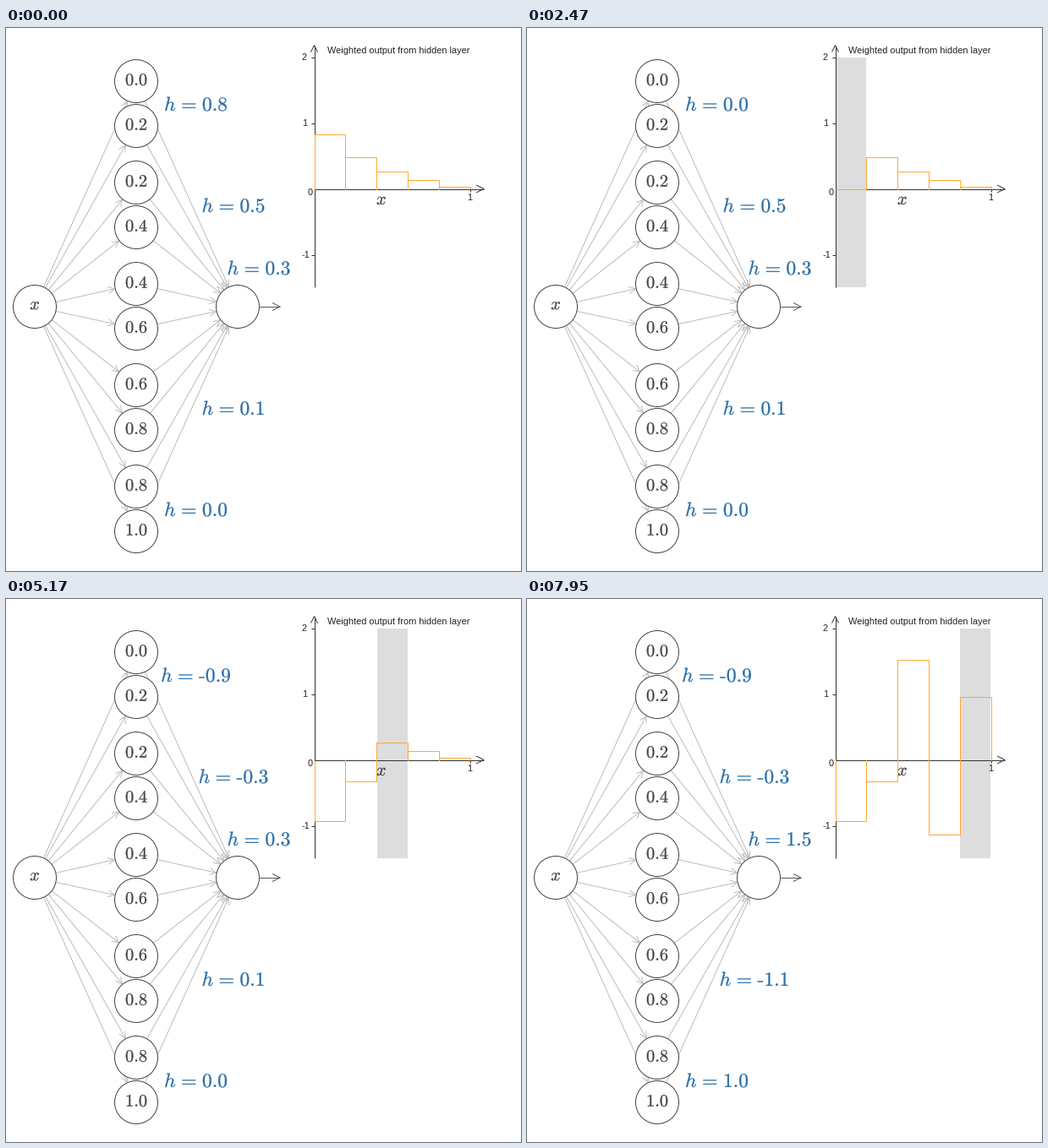
A matplotlib script that plays this animation: 609x643 px, repeating every 8000 ms.

```python
from functools import lru_cache

import matplotlib.pyplot as plt
import numpy as np
from matplotlib.animation import FuncAnimation
from matplotlib.patches import Circle, PathPatch, Rectangle
from matplotlib.path import Path
from matplotlib.textpath import TextPath
from matplotlib.transforms import Affine2D

WIDTH, HEIGHT, DPI = 609, 643, 100
PX = 72 / DPI  # one pixel in points
LOOP, INTERVAL = 8000, 20
TICK, TICK_SHIFT = 77.3, 17  # pointer sampling period and phase, ms

INK, AXIS, WIRE = "#444444", "#333333", "#bdbdbd"
BLUE, ORANGE, SHADE = "#2a6ea6", "#ffa833", "#dddddd"

ORIGIN_X, ORIGIN_Y = 364.5, 190.5
UNIT, BAR = 78, 36.8
RADIUS = 25.5
INPUT, OUTPUT = (34, 330), (274, 330)
LABEL_SIZE = 23.5
LABEL_SPOTS = [(224.5, 98), (269, 218), (299, 292), (269, 458), (224.5, 578)]

# (tick, height) keys of each bar while it is dragged
KEYS = [
    [(12, .83), (13, .6), (23, 1.46), (25, 1.53), (27, 1.53), (32, 0), (38, -.92), (39, -.93)],
    [(45, .48), (46, .4), (47, .4), (54, 1.55), (55, 1.54), (58, .1), (59, -.06), (62, -.33)],
    [(70, .26), (78, 1.52)],
    [(86, .135), (92, -1.12), (93, -1.12), (94, -1.14)],
    [(99, .03), (100, .09), (101, .09), (102, .6), (103, .96)],
]
# (tick, bar) moments at which the pointer enters a bar
HOVERS = [(4, 2), (5, 0), (40, 1), (67, 2), (81, 3), (95, 4)]

plt.rcParams["mathtext.fontset"] = "cm"
fig = plt.figure(figsize=(WIDTH / DPI, HEIGHT / DPI), dpi=DPI, facecolor="white")
ax = fig.add_axes([0, 0, 1, 1])
ax.set(xlim=(0, WIDTH), ylim=(HEIGHT, 0))
ax.axis("off")


def stroke(points, color):
    path = Path(points)
    return ax.add_patch(PathPatch(path, fill=False, edgecolor=color, lw=PX))


def arrow(start, end, color, back=8, half=4):
    start, end = np.array(start, float), np.array(end, float)
    along = (end - start) / np.hypot(*(end - start))
    side = np.array([-along[1], along[0]])
    stroke([start, end], color)
    base = end - back * along
    stroke([base + half * side, end, base - half * side], color)


def link(a, b):
    """Arrow between the rims of two nodes."""
    a, b = np.array(a, float), np.array(b, float)
    rim = RADIUS * (b - a) / np.hypot(*(b - a))
    arrow(a + rim, b - 1.02 * rim, WIRE)


def node(center):
    ax.add_patch(Circle(center, RADIUS, facecolor="white", edgecolor=INK, lw=PX))


@lru_cache(None)
def math_path(text, size):
    return TextPath((0, 0), f"${text}$", size=size)


def ink(path, x, y, color):
    """Glyph outlines with their baseline at (x, y)."""
    place = Affine2D().scale(1, -1).translate(x, y) + ax.transData
    return ax.add_patch(PathPatch(path, facecolor=color, edgecolor=color,
                                  lw=0.3 * PX, transform=place))


def box(x0, x1, y0, y1):
    return Path([(x0, y0), (x1, y0), (x1, y1), (x0, y1), (x0, y0)], closed=True)


@lru_cache(None)
def label_path(tenths):
    """Centred 'h = value' with a hyphen as the minus sign."""
    em = Affine2D().scale(LABEL_SIZE)
    shift = 1.91 + (.333 if tenths < 0 else 0)
    parts = [math_path("h", LABEL_SIZE),
             box(.91, 1.576, .327, .367).transformed(em),
             box(.91, 1.576, .133, .173).transformed(em)]
    if tenths < 0:
        parts.append(box(1.921, 2.186, .187, .245).transformed(em))
    digits = math_path(f"{abs(tenths) / 10:.1f}", LABEL_SIZE)
    parts.append(digits.transformed(Affine2D().translate(shift * LABEL_SIZE, 0)))
    middle = (shift + 1.278) * LABEL_SIZE / 2
    return Path.make_compound_path(*parts).transformed(Affine2D().translate(-middle, 0))


def sans(x, y, text, ha="left"):
    ax.text(x, y, text, family="Liberation Sans", size=11 * PX, color="#222222",
            ha=ha, va="baseline")


# network
hidden = [(154, 89.5 + 120 * i + d) for i in range(5) for d in (-26.5, 26.5)]
for spot in hidden:
    link(INPUT, spot)
    link(spot, OUTPUT)
for i, (x, y) in enumerate(hidden):
    node((x, y))
    ink(math_path(f"{(i + 1) // 2 * .2:.1f}", 20.4), x - 13, y + 4.8, INK)
node(INPUT)
node(OUTPUT)
ink(math_path("x", 20.4), 28.2, 333.3, INK)
arrow((299.5, 330), (324, 330), "#555555", 9, 4.5)
labels = [ink(label_path(0), x, y, BLUE) for x, y in LABEL_SPOTS]

# chart
shade = ax.add_patch(Rectangle((0, 35), BAR - .8, 272, facecolor=SHADE, lw=0))
arrow((ORIGIN_X, 307), (ORIGIN_X, 20.5), AXIS, 8, 4)
arrow((ORIGIN_X, ORIGIN_Y), (565, ORIGIN_Y), AXIS, 9, 4.5)
for value in (2, 1, -1):
    y = ORIGIN_Y - UNIT * value
    stroke([(361, y), (ORIGIN_X, y)], AXIS)
    sans(350, y + 3, str(value))
stroke([(548.5, ORIGIN_Y), (548.5, 194)], AXIS)
sans(357, 198, "0")
sans(548, 204, "1", "center")
sans(380, 30, "Weighted output from hidden layer")
ink(math_path("x", 20.4), 438, 209, INK)
steps = stroke([(0, 0), (1, 1)], ORANGE)


def update(frame):
    tick = int(((frame + .5) * INTERVAL + TICK_SHIFT) // TICK)
    heights = [np.interp(tick, *zip(*keys)) for keys in KEYS]

    outline = []
    for i, height in enumerate(heights):
        x0, x1 = ORIGIN_X + BAR * i, ORIGIN_X + BAR * (i + 1)
        y = ORIGIN_Y - UNIT * height
        outline += [(x0, ORIGIN_Y), (x0, y), (x1, y), (x1, ORIGIN_Y)]
    steps.set_path(Path(outline))

    for label, height in zip(labels, heights):
        label.set_path(label_path(int(round(height * 10))))

    entered = [bar for start, bar in HOVERS if tick >= start]
    shade.set_visible(bool(entered))
    if entered:
        shade.set_x(ORIGIN_X + BAR * entered[-1] + .5)
    return [steps, shade, *labels]


animation = FuncAnimation(fig, update, frames=LOOP // INTERVAL, interval=INTERVAL,
                          repeat=True, repeat_delay=0)
plt.show()
```
